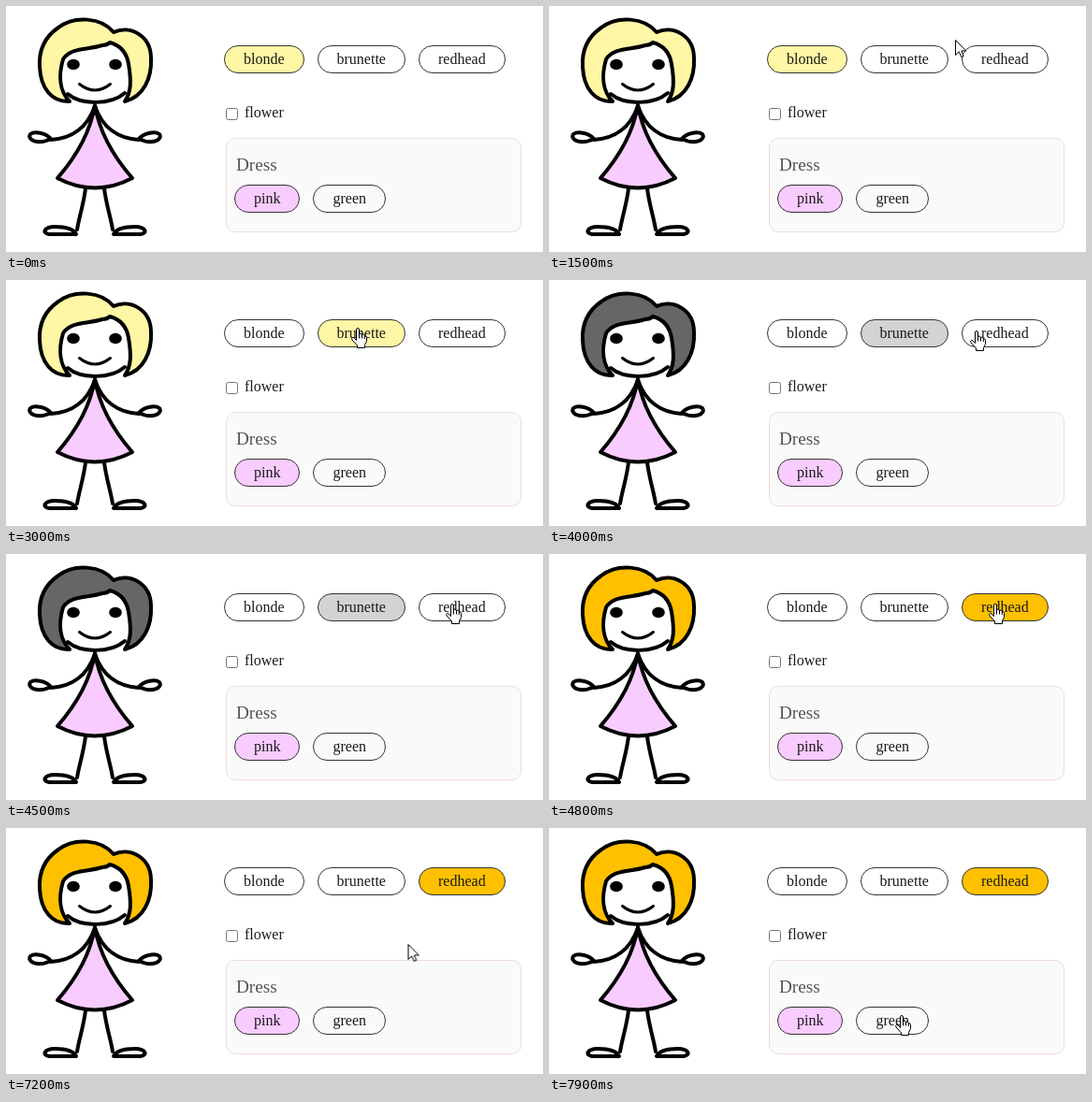
Write an HTML page that moves like this. It is 574 px wide and 263 px high and loops after 8000 ms.

```html
<!DOCTYPE html>
<html lang="en">
<head>
<meta charset="utf-8">
<title>Dress-up doll</title>
<style>
:root { --blonde: #fff7a5; --brown: #666; --grey: #d3d3d3; --red: #ffc000; --pink: #f9ccff; }
html, body { margin: 0; width: 100%; height: 100%; overflow: hidden; background: #fff; }
svg { display: block; width: 574px; height: 263px; }
text { font: 16px "Liberation Serif", "Times New Roman", serif; fill: #1a1a1a; }
.title { font-size: 19.2px; fill: #555; }
.line { fill: none; stroke: #000; stroke-width: 4; stroke-linecap: round; stroke-linejoin: round; }
.pill { fill: #fff; stroke: #333; }
.cursor path { fill: #fff; stroke: #000; stroke-linejoin: round; }

.hair, .blonde, .brunette, .redhead, .cursor, .arrow, .hand {
  animation: 8s step-end -5ms infinite;
}
.hair { animation-name: hair; }
.blonde { animation-name: blonde; }
.brunette { animation-name: brunette; }
.redhead { animation-name: redhead; }
.cursor { animation-name: move; }
.arrow { animation-name: arrow; }
.hand { animation-name: hand; }

@keyframes hair {
  0% { fill: var(--blonde); }
  38.75% { fill: var(--brown); }
  60%, 100% { fill: var(--red); }
}
@keyframes blonde {
  0% { fill: var(--blonde); }
  37.5%, 100% { fill: #fff; }
}
@keyframes brunette {
  0% { fill: #fff; }
  37.5% { fill: var(--blonde); }
  38.75% { fill: var(--grey); }
  58.75%, 100% { fill: #fff; }
}
@keyframes redhead {
  0% { fill: #fff; }
  58.75% { fill: var(--grey); }
  60%, 100% { fill: var(--red); }
}
/* The pointer is redrawn every 100 ms, hence the steps. */
@keyframes move {
  0% { transform: translate(568px, 25px); }
  13.75% { transform: translate(568px, 25px); animation-timing-function: steps(4); }
  18.75% { transform: translate(434px, 36px); animation-timing-function: steps(2); }
  21.25% { transform: translate(396px, 47px); animation-timing-function: steps(2); }
  23.75% { transform: translate(377px, 51px); }
  25% { transform: translate(375px, 51px); }
  46.25% { transform: translate(380px, 52px); animation-timing-function: steps(3); }
  50% { transform: translate(456px, 54px); animation-timing-function: steps(3); }
  53.75% { transform: translate(475px, 53px); }
  56.25% { transform: translate(476px, 53px); }
  81.25% { transform: translate(476px, 54px); animation-timing-function: steps(2); }
  83.75% { transform: translate(472px, 62px); animation-timing-function: steps(4); }
  88.75% { transform: translate(437px, 113px); animation-timing-function: steps(2); }
  91.25% { transform: translate(422px, 135px); }
  92.5% { transform: translate(413px, 147px); animation-timing-function: steps(3); }
  96.25% { transform: translate(387px, 187px); animation-timing-function: steps(2); }
  98.75%, 100% { transform: translate(376px, 200px); }
}
@keyframes arrow {
  0%, 20%, 50%, 97.5%, 100% { opacity: 0; }
  13.75%, 48.75%, 85% { opacity: 1; }
}
@keyframes hand {
  0%, 48.75%, 85% { opacity: 0; }
  20%, 50%, 97.5%, 100% { opacity: 1; }
}
</style>
</head>
<body>
<svg viewBox="0 0 574 263">
  <defs>
    <g id="limbs" class="line">
      <path d="M95 107C87 130 70 142 48 143"/>
      <path d="M48 142C42 135 30 134 26 137C22 143 34 149 48 142"/>
      <path d="M85 195C83 212 78 226 76 239"/>
      <path d="M75 244H46C38 243 41 236 52 236C63 236 72 238 75 244Z"/>
    </g>
  </defs>

  <!-- doll -->
  <use href="#limbs"/>
  <use href="#limbs" transform="matrix(-1 0 0 1 190 0)"/>
  <path class="line" style="fill:var(--pink)" d="M95 106C90 136 75 161 55 184Q95 205 135 184C115 161 100 136 95 106Z"/>
  <path class="line" d="M66 94C80 106 112 106 127 93"/>
  <g class="hair">
    <path class="line" style="fill:inherit" d="M115 28C102 12 73 10 56 23C40 34 35 49 36 65C37 88 49 103 68 102C57 91 56 74 61 57C69 44 88 47 103 42Q108 42 111 39C122 42 129 50 131 62C134 80 134 92 127 102C147 97 156 77 155 56C155 31 132 20 115 28Z"/>
  </g>
  <ellipse cx="72" cy="62.5" rx="6.8" ry="5.8"/>
  <ellipse cx="117" cy="62.5" rx="6.8" ry="5.8"/>
  <path class="line" style="stroke-width:3" d="M78.5 83.5Q95 96.5 111.5 83.5"/>

  <!-- hair colour -->
  <rect class="pill blonde" x="233.5" y="42.5" width="85" height="29" rx="14.5"/>
  <rect class="pill brunette" x="333.5" y="42.5" width="93" height="29" rx="14.5"/>
  <rect class="pill redhead" x="441.5" y="42.5" width="92" height="29" rx="14.5"/>
  <text x="254" y="62">blonde</text>
  <text x="353.5" y="62">brunette</text>
  <text x="462" y="62">redhead</text>

  <rect x="235.5" y="109.5" width="12" height="12" rx="2" fill="#fff" stroke="#767676"/>
  <text x="255" y="119">flower</text>

  <!-- dress colour -->
  <rect x="235.5" y="141.5" width="315" height="100" rx="9.5" fill="#fafafa" stroke="#efdcd7"/>
  <text class="title" x="246" y="176">Dress</text>
  <rect class="pill" style="fill:var(--pink)" x="244.5" y="191.5" width="69" height="29" rx="14.5"/>
  <rect class="pill" style="fill:none" x="328.5" y="191.5" width="77" height="29" rx="14.5"/>
  <text x="265" y="211">pink</text>
  <text x="349.5" y="211">green</text>

  <g class="cursor">
    <path class="arrow" d="M.5 .5V16.5L4.3 12.9L6.7 18.5L9.2 17.4L6.9 12H11.8Z"/>
    <g class="hand">
      <path transform="translate(-6)" d="M5.5 13.5V2Q5.5 .5 7 .5T8.5 2V7Q8.7 5.8 10 6T11.5 8Q12 6.7 13.2 7T14.3 9Q16.5 8.3 16.5 10.5V14.5L14.5 18.5V21.5H6.5V19L1 13Q0 11 1.5 10.5T4 12ZM8.5 7V11.5M11.5 8V11.5M14.3 9V12"/>
    </g>
  </g>
</svg>
</body>
</html>
```
